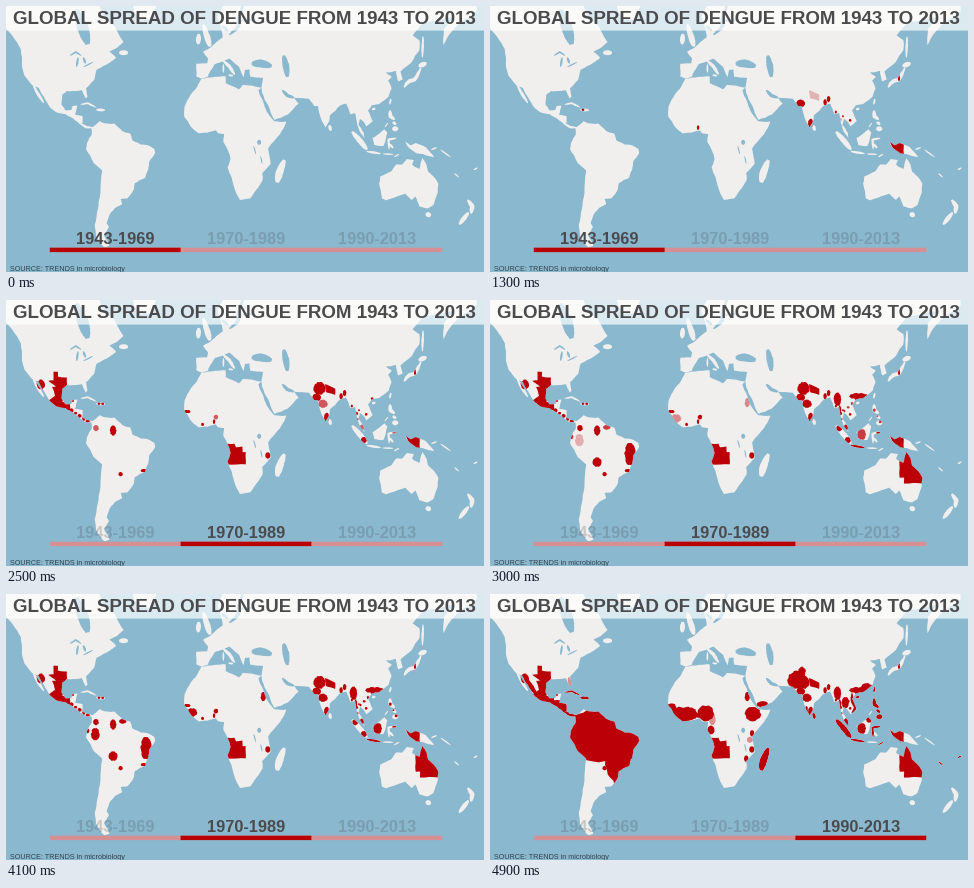
Write a matplotlib script that moves like this. It is 478 px wide and 266 px high and loops after 5 s.

```python
import numpy as np
import matplotlib.pyplot as plt
from matplotlib.animation import FuncAnimation
from matplotlib.patches import PathPatch, Polygon, Rectangle
from matplotlib.path import Path

W, H, DPI = 478, 266, 100
FRAMES, INTERVAL, FADE = 50, 100, 4
OCEAN, LAND, RED, PALE, INK = "#8ab8cf", "#f0efed", "#bb0008", "#d68f92", "#4b4b4d"

plt.rcParams["font.family"] = "Liberation Sans"
rng = np.random.default_rng(8)
fig = plt.figure(figsize=(W / DPI, H / DPI), dpi=DPI, facecolor=OCEAN)
ax = fig.add_axes([0, 0, 1, 1])
ax.set_xlim(0, W)
ax.set_ylim(H, 0)
ax.axis("off")


def project(flat):
    """Flat lon, lat values to Mercator pixels; the Americas sit a little further west."""
    lon, lat = np.reshape(flat, (-1, 2)).T
    mercator = np.degrees(np.log(np.tan(np.pi / 4 + np.radians(lat) / 2)))
    return np.column_stack([204 + 1.49 * lon - 3 * (lon < -30), 134.5 - 1.6 * mercator])


def roughen(xy, amount):
    """Fractal outline: push the middle of each side in or out, twice."""
    for _ in range(2):
        side = np.roll(xy, -1, axis=0) - xy
        push = rng.uniform(-amount, amount, (len(xy), 1))
        middle = xy + side / 2 + push * side[:, ::-1] * (1, -1)
        xy = np.stack([xy, middle], axis=1).reshape(-1, 2)
    return xy


def outline(*flat):
    return roughen(project(flat), .05)


def strip(width, *flat):
    """Tapered ribbon, width in pixels, along a few points."""
    points = project(flat)
    t = np.linspace(0, 1, 9)
    knots = np.linspace(0, 1, len(points))
    line = np.column_stack([np.interp(t, knots, column) for column in points.T])
    along = np.gradient(line, axis=0)
    normal = along[:, ::-1] * (1, -1) / np.linalg.norm(along, axis=1)[:, None]
    half = normal * (width / 2 * np.sqrt(np.sin(np.pi * (.04 + .92 * t))))[:, None]
    return roughen(np.vstack([line + half, (line - half)[::-1]]), .08)


def blob(lon, lat, w, h):
    a = np.arange(0, 2 * np.pi, np.pi / 5)
    return roughen(project(np.column_stack([lon + w / 2 * np.cos(a), lat + h / 2 * np.sin(a)])), .15)


def chain(count, size, lon0, lat0, lon1, lat1):
    return [blob(lon, lat, *rng.uniform(.7, 1.3, 2) * size)
            for lon, lat in zip(np.linspace(lon0, lon1, count), np.linspace(lat0, lat1, count))]


north_america = outline(
    -145, 72, -145, 60, -136, 58, -130.5, 54.5, -125, 49.5, -124.2, 42, -122.5, 37.5, -117.1, 32.5,
    -113, 31.3, -109.3, 26, -105.5, 20.5, -101, 17.3, -94.8, 16.2, -90, 13.7, -85.7, 10.8,
    -83.5, 10.8, -83.5, 15, -88.5, 15.8, -87, 21.3, -90.3, 21.1, -91, 18.8, -95, 18.5, -97.7, 22,
    -97.2, 27.5, -94, 29.5, -89.5, 29.5, -84, 30, -81.5, 25.3, -80.2, 26.5, -81.2, 31, -75.7, 35.4,
    -74, 40.5, -70, 42, -65, 43.8, -61, 45.8, -65.5, 48.5, -60, 50.2, -56, 52.3, -62, 58, -70, 61.5,
    -85, 72)
south_america = outline(
    -77.5, 8, -72, 12, -68, 10.6, -62, 10.5, -57, 6, -51.5, 4.3, -50, 0, -44.5, -2.5, -40, -2.9,
    -35.3, -5.3, -34.8, -7.8, -38.8, -13, -39.5, -18, -41.5, -22.7, -48.5, -25.8, -49, -29,
    -53.5, -34, -58, -34.3, -57, -37, -62, -39, -65, -41.5, -67.3, -46, -65.8, -47.5, -69, -51,
    -65.5, -54.8, -69, -55.3, -74.5, -51, -75.3, -46.5, -73.5, -40, -71.5, -31, -70.3, -18.5,
    -76, -14, -81.2, -5.5, -80.5, -1.5, -77.3, 3.8)
africa = outline(
    -6, 35.8, 3, 36.9, 10.5, 37.2, 10.5, 33.8, 19.5, 30.4, 22, 32.8, 34.4, 31.3, 32.5, 29.9,
    35.5, 24, 38, 18, 43, 12, 51.2, 11.8, 47, 4, 39, -5, 40.7, -14.5, 35, -20, 35.3, -24, 32.5, -28,
    27, -34, 20, -34.8, 18, -32, 14.5, -22.5, 11.8, -16.5, 13.8, -11.5, 9, -1, 9.5, 4, 5.5, 4.5,
    4, 6.3, -2, 4.8, -7.5, 4.4, -13, 8.8, -17.3, 14.7, -17, 21, -13, 27.5, -9.7, 30.5)
europe = outline(
    -9.2, 43.2, -9.2, 37.2, -5.5, 36, -1.5, 37, 0, 39.5, 3.2, 43, 8, 44, 13, 45.5, 19.5, 41.8,
    22.5, 36.7, 23.5, 40.4, 26.5, 40.5, 27, 37, 30.5, 36.6, 46, 36.4, 46, 72, 28, 71, 12, 67,
    5, 61, 7, 58, 8.5, 54, 3, 51.5, -1, 49.6, -4.7, 48.4, -1.3, 45.5, -1.8, 43.4)
asia = outline(
    36, 37, 34.5, 31.3, 35, 28.5, 39, 21.5, 43.2, 12.8, 52.2, 16, 59.5, 22.5, 56.5, 25.8, 66.5, 25.2,
    70, 21, 72.6, 21, 74.5, 13.5, 77.5, 8.1, 80, 12, 80.5, 15.5, 87, 21.2, 91.5, 22.5, 94.3, 16.2,
    97.5, 16.8, 98.7, 10, 100.5, 5.5, 103.6, 1.4, 103.2, 4.8, 99.6, 10, 100.6, 13.4, 102.7, 12,
    105, 8.8, 109.2, 12, 106, 18.5, 108.5, 21.5, 113.5, 22.2, 120, 26.5, 121.8, 31, 119.5, 35,
    122, 37, 118, 39, 124.8, 39.8, 126.3, 34.6, 129.3, 35.6, 127.8, 39.5, 135.5, 44, 140.5, 49,
    140.5, 53, 136, 54.8, 143, 59.2, 164, 61, 157, 57, 156.7, 51, 162, 56, 179, 62.5, 179, 72, 45, 72)
australia = outline(
    142.5, -10.8, 145.4, -15, 146.3, -19, 149.5, -21.5, 153.2, -26, 152.8, -31, 149.9, -37.4,
    146.4, -39, 140.5, -38, 137.8, -33, 135.5, -34.8, 131, -31.5, 124, -33.5, 118, -35, 115.3, -34,
    113.5, -26, 114.2, -22, 121.5, -19, 125, -14.8, 129, -14.8, 132, -11.5, 136.8, -12.2, 135.7, -15,
    140.5, -17.5, 141.7, -13)
new_guinea = outline(131, -.8, 134.5, -3, 138, -1.6, 145, -4.3, 150.5, -10.4, 143, -8.5, 138.5, -8,
                     133, -4)
borneo = outline(109, 1.5, 114, 4.6, 117, 7, 119, 5, 116.3, -3.5, 110.2, -2.8)

cuba = strip(2, -84.8, 22, -80, 22.7, -74.3, 20.2)
hispaniola = strip(2.8, -74.3, 18.9, -68.5, 18.6)
panama = strip(2.4, -86, 11, -81, 8.3, -77, 8)
madagascar = strip(7.5, 45, -25.5, 46.5, -20, 49.8, -12)
sumatra = strip(5.5, 95.3, 5.5, 101, -.5, 105.5, -5.8)
java = strip(2.4, 105.2, -6.8, 114.5, -8.2)
sulawesi = strip(2.5, 120.2, -5.5, 119.8, .6, 125, 1.4)
luzon = strip(4, 120.8, 18.5, 121, 15, 124, 13)
visayas = strip(3, 122.5, 11.5, 125, 10)
mindanao = strip(5, 122.3, 7.3, 126.3, 7.3)
taiwan = strip(2, 120.6, 22, 121.4, 25.2)
hainan = strip(2.5, 108.7, 19, 111, 19.6)
sri_lanka = strip(3.4, 80.2, 9.6, 81, 6)
timor = strip(1.4, 123.6, -10.2, 127, -8.5)
fiji = strip(1.6, 177, -18, 179.5, -16.8)
caledonia = strip(1.4, 164, -20.1, 167, -22.4)

rings = [
    north_america, south_america, africa, europe, asia, australia, new_guinea, borneo, cuba,
    hispaniola, panama, madagascar, sumatra, java, sulawesi, luzon, visayas, mindanao, taiwan,
    hainan, sri_lanka, timor, fiji, caledonia,
    strip(3, -116.5, 32.4, -113.5, 28, -109.6, 22.9),    # Baja California
    strip(5, -59, 48, -53, 48),                          # Newfoundland
    strip(26, -42, 60, -42, 72),                         # Greenland
    strip(6, -24, 65, -14, 65),                          # Iceland
    strip(6, 0, 50.5, -1.5, 53.5, -4.5, 58.5),           # Britain
    strip(5, -8, 51.4, -7.5, 55.3),                      # Ireland
    strip(3.6, 9, 44.4, 13, 42, 16.5, 38),               # Italy
    strip(1.8, 9, 43, 9, 39),                            # Corsica, Sardinia
    strip(2, 12.4, 37.8, 15.5, 37.5),                    # Sicily
    strip(4, 130.2, 31.5, 133, 34.5, 138, 35.8, 141.5, 41.3),
    strip(5, 140, 42, 145.3, 43.5),                      # Hokkaido
    strip(2.4, 142.5, 46, 143, 54.3),                    # Sakhalin
    strip(1.6, 116, -8.4, 123, -8.6),                    # Lesser Sundas
    strip(2.4, 120.3, -2, 123, -4.8),
    strip(1.2, 117.3, 8.3, 119.5, 11),                   # Palawan
    strip(1.6, 148.5, -5.7, 152.2, -4.4),                # New Britain
    strip(1.4, 154.7, -5.8, 161.5, -10.3),               # Solomons
    strip(5, 144.8, -41.5, 148.2, -42.5),                # Tasmania
    strip(4.6, 173, -34.7, 176, -38, 175.2, -41.5),
    strip(4.6, 173.6, -41, 167.2, -46.4),                # New Zealand
]


def merged(shapes):
    """One path of all shapes with equal winding, so overlaps unite."""
    paths = []
    for xy in shapes:
        x, y = xy.T
        clockwise = np.sum(x * np.roll(y, -1) - y * np.roll(x, -1)) < 0
        paths.append(Polygon(xy[::-1] if clockwise else xy).get_path())
    return Path.make_compound_path(*paths)


world = merged(rings)
ax.add_patch(PathPatch(world, fc=LAND, ec="none"))
regions = []


def spread(start, *shapes):
    patch = ax.add_patch(PathPatch(merged(shapes), fc=RED, ec="none", alpha=0))
    patch.set_clip_path(world, ax.transData)
    regions.append((start, patch))


# First era
spread(2, blob(71.5, 22.5, 6, 4.5), blob(88, 23.2, 2.4, 3.6), *chain(3, 1.6, 95.2, 17.5, 104.8, 12.5))
spread(3, blob(137.6, 36.2, 1.4, 3), blob(90.3, 25, 2.4, 3.6), blob(-72.5, 19, 1.8, 1.8))
spread(5.5, blob(78.3, 10.8, 3.4, 5.5), blob(2.7, 8, 1.6, 3), blob(-66.5, 18.2, 1.5, 1.5),
       outline(130, 1, 141, 1, 141, -9.5, 137, -9.5))
spread(12, outline(77.2, 30, 84, 27.5, 84, 24, 78, 25.5), *chain(2, 1.6, 98.5, 13, 98.8, 9.5))
spread(15, blob(108.8, 21.8, 1.8, 1.8))
spread(17, blob(-111.5, 29.8, 5.5, 5.5))
spread(18.5, blob(38.8, -13, 3.5, 4), blob(103.3, -3.5, 4, 4))

# Second era
spread(20.3,
       outline(-106.5, 31.8, -103, 32, -103, 36.5, -100, 36.5, -100, 34, -94, 33.5, -94, 29.5,
               -97.5, 25.8, -102.5, 29.5),
       outline(-104, 28.5, -99, 28.5, -96.5, 25.5, -97, 20, -92, 19, -92, 15, -98, 15, -106.5, 20.5,
               -102, 23.5),
       outline(11, -5.8, 16.5, -5.8, 17.5, -8, 21.8, -7.5, 22, -11, 24, -11, 24, -18.3, 11, -18.3))
spread(21, *chain(5, 2.4, -91, 14.8, -80, 8.3), *chain(4, 1.7, -90, 20.5, -70, 19),
       blob(73.5, 27.6, 8, 7.5), blob(-63, 2.5, 4.5, 6.5), blob(-58, -24, 3, 2.5),
       blob(-42.5, -22, 4, 2), blob(-15.3, 14.2, 4.5, 2), blob(-5, 6.3, 2, 2))
spread(22.5, blob(-74.5, 4, 3.8, 4), blob(4, 10.8, 3, 3), blob(75.8, 18.8, 6.5, 5),
       blob(101.8, 4.2, 3, 4), blob(123.8, 1, 3, 1.5))
spread(26, blob(-41, -12, 7.5, 14), blob(-63, -17, 6, 6), blob(96.3, 21.5, 5, 8),
       blob(97.8, 15, 2, 6), blob(110.5, 23.3, 13, 3.8), java, blob(97.5, 4, 4, 4),
       outline(138, -15, 141.5, -10, 147, -14, 154, -25, 154, -29.3, 141, -29.3, 141, -26, 138, -26))
spread(27, blob(112.5, 0, 6, 7), blob(-56.5, 4.5, 5, 3), blob(-80, -1.5, 2.2, 3),
       *chain(3, 2, 101, 14.5, 106, 19), *chain(3, 1.7, 121, 15, 125, 8))
spread(28.3, blob(-12, 10, 7, 5.5), blob(35.8, 19.5, 3.4, 5.5))
spread(28.9, blob(-75, -3.5, 6, 8))

# Third era
spread(43, blob(-58, -3, 52, 36), blob(-49, -20, 17, 26), strip(5, -113, 32, -109, 27, -103, 20),
       strip(9, -93, 16, -87, 14.5, -83, 10), panama)
spread(43.5, blob(-7, 9, 20, 9.5), blob(-15, 13.5, 6, 4), blob(8, 9.5, 11, 10),
       blob(69, 29, 13, 10), blob(72.5, 33.5, 5, 5), blob(75.5, 11, 2, 6))
spread(44, cuba, hispaniola, madagascar, taiwan, hainan, sri_lanka, sumatra, sulawesi, timor, luzon,
       visayas, mindanao, fiji, caledonia, blob(11.3, -1, 5, 5.5), blob(39.5, 9, 11, 9),
       blob(46, 14.8, 8, 4), blob(101.5, 16, 5, 7), blob(116, 24.8, 8, 5), blob(102.3, 3.5, 4, 6))
spread(45, strip(3, 106, 21.5, 106, 17, 108.5, 13, 106, 9.5), blob(39, -3, 3, 4),
       blob(35, -18.5, 3, 4), blob(117.5, 5.5, 4, 4))
spread(47.4, strip(3.5, -82, 30.5, -80.8, 25), blob(12.3, 6, 4.5, 8), blob(37.5, -7, 4, 4))

waters = [
    strip(8, 28, 43.2, 34, 43.4, 41.5, 42),              # Black Sea
    strip(6.5, 49.5, 46.8, 51, 42, 52, 36.8),            # Caspian
    strip(3.6, 48.5, 30, 52, 27, 56.5, 25.8),            # Persian Gulf
    strip(4, 13, 55, 19, 57.5, 19.5, 61, 23, 65.5),      # Baltic
    strip(3, 8, 58, 12, 56.5),
    strip(2.5, 20, 59.7, 30, 60),
    strip(11, -88, 63, -83, 57, -80, 51.3),              # Hudson Bay
    strip(1.8, -92, 46.8, -88, 48.3, -84.5, 46.8),       # Great Lakes
    strip(2.2, -87.5, 41.8, -86.5, 46),
    strip(2.4, -81.5, 43.3, -83, 46),
    strip(1.3, -83, 41.7, -76.5, 43.9),
    strip(4, 33, .4, 33, -2.6),                          # Victoria
    strip(1.2, 29.3, -3.5, 30.8, -8.5),
    strip(1.2, 34, -9.7, 35, -14.3),
]
ax.add_patch(PathPatch(merged(waters), fc=OCEAN, ec="none"))


def label(x, baseline, text, size, **style):
    return ax.text(x, baseline, text, fontsize=size * 72 / DPI, va="baseline", **style)


def bar(x, y, w, h, **style):
    return ax.add_patch(Rectangle((x, y), w, h, ec="none", snap=False, **style))


bar(0, 0, W, 24.6, fc="white", alpha=.7)
label(238, 18.4, "GLOBAL SPREAD OF DENGUE FROM 1943 TO 2013", 18.75, ha="center",
      color=INK, weight="bold")
label(4, 265, "SOURCE: TRENDS in microbiology", 7.25, ha="left", color="#34434c")

BAR_X, BAR_Y, STEP, BAR_H = 43.8, 241.7, 130.8, 4.4
bar(BAR_X, BAR_Y, 3 * STEP, BAR_H, fc=PALE)
marker = bar(BAR_X, BAR_Y, STEP, BAR_H, fc="#b80203")
eras = [label(BAR_X + STEP * (k + .5), 237.6, text, 16.4, ha="center", color=INK, weight="bold")
        for k, text in enumerate(("1943-1969", "1970-1989", "1990-2013"))]


def ease(t):
    t = np.clip(t, 0, 1)
    return t * t * (3 - 2 * t)


def update(i):
    for start, patch in regions:
        patch.set_alpha(float(np.clip((i - start) / FADE, 0, 1)))
    era = ease((i - 19.2) / 5.8) + ease((i - 43) / 6)
    marker.set_x(BAR_X + STEP * era)
    for k, text in enumerate(eras):
        text.set_alpha(.24 + .76 * max(0, 1 - abs(era - k)))
    return []


anim = FuncAnimation(fig, update, frames=FRAMES, interval=INTERVAL, repeat=True, repeat_delay=0)
plt.show()
```
